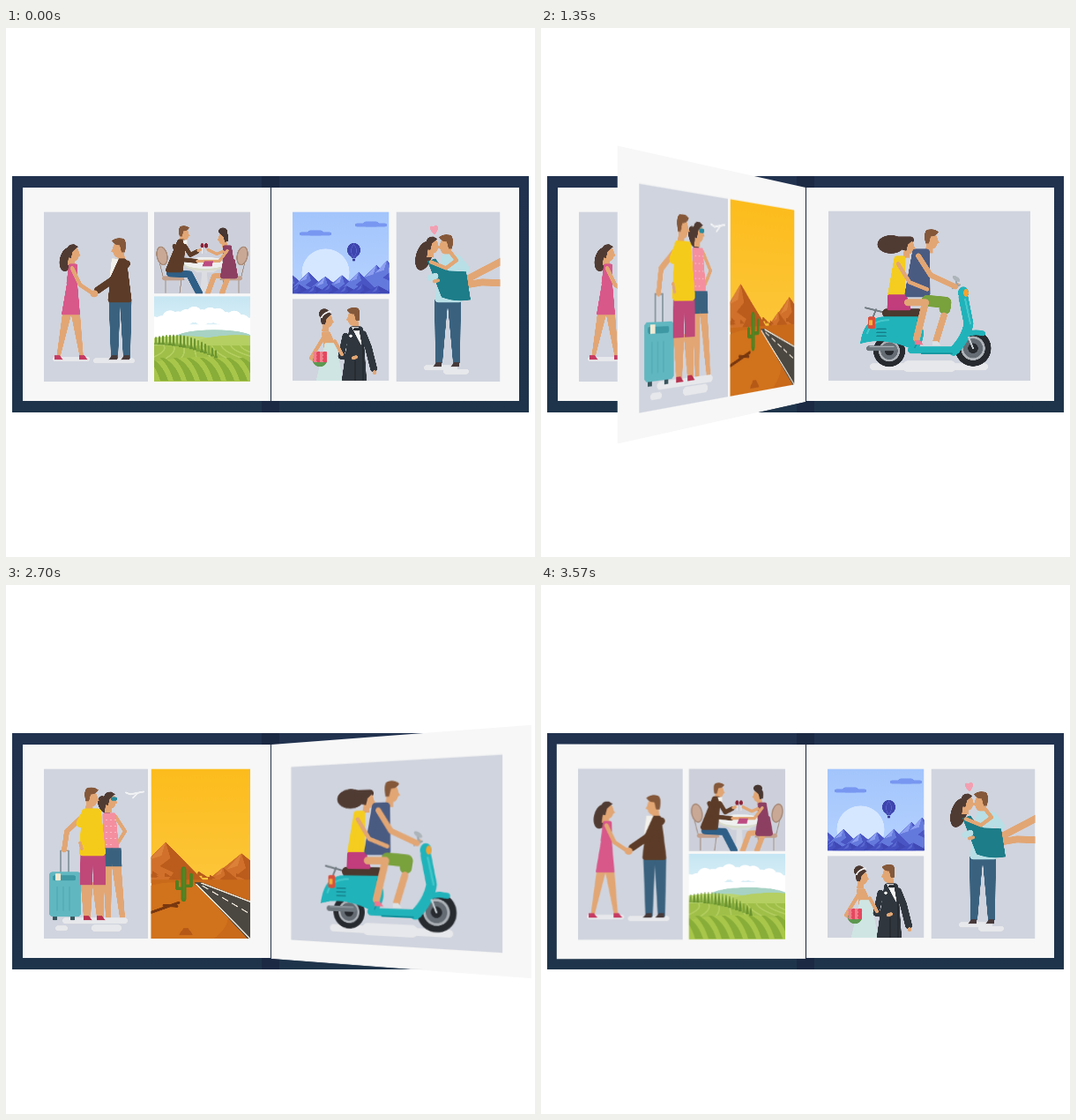
These frames come from a looping animation (600x600 px, 3.6 s). An HTML page with a canvas:

```html
<!DOCTYPE html>
<html lang="en">
<head>
<meta charset="utf-8">
<title>Photo album</title>
<style>
  html, body { margin: 0; width: 100%; height: 100%; overflow: hidden; background: #fff; }
  #stage { position: relative; width: 600px; height: 600px; overflow: hidden; perspective: 838px; perspective-origin: 300.5px 302px; }
  canvas { position: absolute; }
</style>
</head>
<body>
<div id="stage"></div>
<script>
const stage = document.getElementById('stage');
const SKIN = '#e2a674', BROWN = '#5c3c28', HAIR = '#85583a', DARK = '#503b33';
const DENIM = '#3a627f', WALL = '#d0d4de', SNOW = '#e7e8eb', PAPER = '#f7f7f7';
const PAGE = { top: 180.5, width: 281, height: 242.5 }, SPINE = 300.5;
let g;

function makeCanvas(x, y, w, h, draw) {
  const el = document.createElement('canvas'), k = 3;
  el.width = w * k;
  el.height = h * k;
  el.style.cssText = `left:${x}px;top:${y}px;width:${w}px;height:${h}px`;
  stage.append(el);
  g = el.getContext('2d');
  g.scale(k, k);
  g.translate(-x, -y);
  g.lineCap = g.lineJoin = 'round';
  draw();
  return el;
}

// Drawing helpers
function paint(color, d) {
  g.fillStyle = color;
  g.fill(new Path2D(d));
}
function limb(color, width, d) {
  g.strokeStyle = color;
  g.lineWidth = width;
  g.stroke(new Path2D(d));
}
function oval(color, x, y, rx, ry = rx, turn = 0) {
  g.fillStyle = color;
  g.beginPath();
  g.ellipse(x, y, rx, ry, turn, 0, Math.PI * 2);
  g.fill();
}
function box(color, x, y, w, h, r = 0) {
  g.fillStyle = color;
  g.beginPath();
  g.roundRect(x, y, w, h, r);
  g.fill();
}
const pill = (color, x, y, w, h) => box(color, x, y, w, h, h / 2);

// Upright shape between two centres, with a width at each end.
function taper(color, x0, y0, w0, x1, y1, w1, r = 0) {
  const a = Math.max(0, w0 / 2 - r), b = w1 / 2 - r;
  const d = `M${x0 - a} ${y0 + r}H${x0 + a}L${x1 + b} ${y1 - r}H${x1 - b}Z`;
  paint(color, d);
  if (r) limb(color, r * 2, d);
}
function legs(color, hip, top, width, feet, floor, ankle) {
  feet.forEach((foot, i) => {
    const side = (i ? 1 : -1) * width / 4;
    taper(color, hip + side, top, width / 2 + 1, foot, floor, ankle);
  });
}
function shoe(color, x, y, dir) {
  paint(color, `M${x - 3 * dir} ${y}v-5h${6 * dir}q${dir} 2 ${4 * dir} 5z`);
}
function head(x, y, dir, size, hair, long) {
  g.save();
  g.translate(x, y);
  g.scale(dir * size, size);
  taper(SKIN, -2, 2, 7, -3, 15, 9);
  oval(SKIN, 1, 1, 6, 9);
  paint(SKIN, 'M5-3L9 3 5 5Z');
  paint(hair, long ? 'M6-8Q2-5-1-2L-3 6-8 5Q-11-12 1-11Z' : 'M8-9Q5-4-1-4L-3 4-7 4Q-10-12-3-12Q4-13 8-9Z');
  g.restore();
}
function fade(y0, y1, from, to) {
  const f = g.createLinearGradient(0, y0, 0, y1);
  f.addColorStop(0, from);
  f.addColorStop(1, to);
  return f;
}
function photo(x, y, w, h, back, draw) {
  g.save();
  g.beginPath();
  g.rect(x, y, w, h);
  g.clip();
  box(back, x, y, w, h);
  draw();
  g.restore();
}
function repeat(n, draw) {
  for (let i = 0; i < n; i++) draw(i, i / (n - 1));
}
function seeded(seed) {
  return () => (seed = seed * 16807 % 2147483647) / 2147483647;
}

// Album pictures
function holdingHands() {
  pill(SNOW, 53, 372.5, 42, 5.5);
  pill(SNOW, 99, 374, 47, 6);
  legs(SKIN, 74, 323, 19, [59, 86], 375, 4);
  shoe('#c63a62', 58, 376, 1);
  shoe('#c63a62', 86, 376, 1);
  oval(DARK, 69, 262, 8, 14, .25);
  head(76.5, 255, 1, .92, DARK, true);
  taper('#d8588a', 76, 267, 10, 75, 291, 13, 2);
  taper('#d8588a', 75, 288, 12, 73.5, 325, 21, 1);
  limb(SKIN, 4.6, 'M75 272L84 291 99 301');
  legs(DENIM, 129.5, 308, 25, [123, 137], 375, 8);
  shoe('#47393a', 123, 376, -1);
  shoe('#47393a', 137, 376, -1);
  head(128, 250, -1, 1, HAIR);
  taper(BROWN, 129, 261, 16, 129, 311, 27, 3);
  taper('#f3f1ec', 124, 261, 8, 118, 282, 1);
  limb(BROWN, 8, 'M137 267L120 286 104 297');
  oval(SKIN, 100, 301, 4.5, 4);
}

function chair(x, dir) {
  const out = d => x + d * dir;
  limb('#a08c82', 1, `M${out(-4)} 261L${out(2)} 285H${out(25)}M${out(4)} 285V300M${out(22)} 285L${out(20)} 300`);
  oval('#a98b79', x, 258, 6.5, 11, -.2 * dir);
  oval('#c9a896', x, 258, 5, 9.5, -.2 * dir);
  pill('#c3a08c', Math.min(out(0), out(25)), 281, 25, 5);
}

function dinner() {
  chair(177, 1);
  chair(268, -1);
  taper('#dcdde2', 226, 268, 44, 226, 277, 18);
  taper('#dcdde2', 225, 270, 6, 225, 300, 8);
  oval('#d8dccb', 226, 268, 24, 7);
  oval('#eef0ef', 226, 266, 24, 6.5);
  limb('#2f5f86', 8, 'M186 278L208 279 219 300');
  head(202, 233, 1, .75, HAIR);
  taper(BROWN, 199, 239, 10, 191, 277, 20, 3);
  taper('#f3f1ec', 203, 240, 5, 205, 254, 1);
  limb(BROWN, 5, 'M203 247L209 257 217 253M191 247L197 262 216 264');
  limb(SKIN, 3.2, 'M218 252L221 251M217 264L222 264');
  limb(SKIN, 6, 'M251 280L236 281 229 300M252 282L245 300');
  oval('#473631', 246, 230, 5, 4);
  head(246, 238, -1, .72, '#473631', true);
  taper('#8d3f62', 251, 246, 10, 252, 266, 13, 2);
  taper('#8d3f62', 253, 261, 14, 253, 284, 20, 3);
  limb(SKIN, 3.4, 'M251 252L242 264 224 264M246 253L239 256 229 251');
  taper('#bd4b82', 230, 264, 10, 228, 270, 11);
  for (const x of [222.5, 227]) {
    oval('#8a2238', x, 246.5, 2, 2.8);
    limb('#f1f1f1', .8, `M${x} 249V255`);
  }
}

function fields() {
  repeat(13, (i, p) => oval('#fff', 168 + p * 109, 336 - 10 * Math.sin(p * Math.PI) + 2 * Math.sin(i * 2.3), 9, 9));
  box('#fff', 168, 336, 109, 18);
  oval('#a7d2c4', 236, 351, 44, 9);
  oval('#bad570', 200, 364, 60, 15);
  oval('#b5cf62', 262, 364, 56, 16);
  box('#9fbf49', 168, 360, 109, 40);
  repeat(9, i => limb('#b4cf60', 1.6, `M${178 + i * 11} 359Q${185 + i * 10} 366 ${165 + i * 17} 374`));
  oval('#a8c64a', 222, 402, 90, 29);
  repeat(9, i => {
    const x = 160 + i * 15;
    paint('#88ad38', `M${x} 374Q${x + 10} 383 ${x + 15} 400h9Q${x + 18} 381 ${x + 4} 374Z`);
  });
  repeat(18, (i, p) => {
    const foot = 359 + 15 * p * p;
    taper(i % 3 ? '#6b942f' : '#7ca539', 170 + i * 4, foot - 9 - 5 * Math.sin(p * Math.PI), 1, 170 + i * 4, foot, 3.6);
  });
}

function peak(x, y, width, base, [side, shade, glow]) {
  taper(side, x, y, 0, x, base, width);
  paint(glow, `M${x} ${y}l${-width * .2} ${width * .22}l${width * .15} ${-width * .05}Z`);
  paint(shade, `M${x} ${y}l${width * .06} ${width * .2}l${-width * .13} ${width * .1}l${width * .17} ${width * .08}L${x} ${base}H${x + width / 2}Z`);
}

function balloon() {
  oval('#d5e7ff', 362.5, 277, 27);
  for (const [x, y] of [[333, 231], [396, 221]]) {
    pill('#7897f1', x, y, 36, 4);
    pill('#7897f1', x + 9, y - 2, 18, 6);
  }
  const blues = ['#6479dc', '#4a55c4', '#8b9ef0'];
  peak(420, 268, 64, 301, blues);
  peak(432, 263, 66, 301, blues);
  repeat(5, i => peak(324 + i * 19, 279 - 3 * Math.sin(i * 2), 50, 301, blues));
  repeat(6, i => peak(332 + i * 18, 290 + i % 2 * 2, 34, 301, ['#4550c0', '#3f48b5', '#5a69d0']));
  oval('#3e45ae', 394.5, 251.5, 7.5, 8);
  taper('#3e45ae', 394.5, 256, 11, 394.5, 261, 3);
  box('#343a96', 393, 261.5, 3, 2.5, .6);
  for (const bend of [-3, 3]) limb('#5962cb', .7, `M394.5 245Q${394.5 + bend * 2} 252 394.5 260`);
}

function wedding() {
  oval('#4b3831', 361, 324, 6);
  head(364.5, 331, 1, .85, '#4b3831', true);
  taper(SKIN, 363, 344, 10, 368, 365, 15, 2);
  taper('#cfe5e3', 368, 357, 13, 367, 402, 31, 1);
  limb('#f0eeee', 1.8, 'M358 328Q360 323 368 321');
  limb(SKIN, 4.3, 'M360 351L346 374 355 381');
  oval('#5d9850', 356, 377, 8, 7);
  repeat(12, i => oval(i % 2 ? '#e4485f' : '#f07f8b', 351 + i % 4 * 3.6, 369 + Math.floor(i / 4) * 3.8, 2.6));
  head(394, 328, -1, .93, HAIR);
  taper('#30363d', 397, 338, 16, 395, 402, 28, 4);
  limb('#30363d', 8, 'M405 347L411 362 417 386');
  taper('#f4f4f4', 396, 339, 8, 403, 359, 1);
  pill('#20252a', 394, 340, 7, 3);
  limb('#171c21', .9, 'M405 359V400M396 377V400');
  limb('#30363d', 7, 'M385 349L380 372 393 374');
  limb(SKIN, 4, 'M373 355L381 370M394 374L397 373M418 390V391');
  oval('#fff', 391, 349, 1.7);
}

function carrying() {
  pill(SNOW, 474, 382, 38, 6);
  pill(SNOW, 496, 386.5, 29, 6);
  paint('#f39fb2', 'M486 234C478 227 481 222 485 225C488 220 494 226 486 234Z');
  legs(DENIM, 501, 308, 29, [491, 511], 380, 8);
  shoe('#47393a', 491, 384, -1);
  shoe('#47393a', 511, 384, -1);
  limb(SKIN, 8, 'M522 285L562 264M522 291L540 288 562 289');
  head(499, 246, -1, 1, HAIR);
  taper('#b8dfe6', 503, 256, 18, 502, 311, 31, 4);
  limb('#b8dfe6', 10, 'M512 262L521 273');
  oval(DARK, 474, 258, 9, 17, .3);
  head(484, 246, 1, .9, DARK, true);
  paint('#1d7d89', 'M478 264L487 261Q494 271 502 275L522 276 527 308Q510 311 494 305Z');
  limb(SKIN, 4.4, 'M482 265L499 272 511 263 504 254');
  limb('#b8dfe6', 7, 'M481 283L487 281');
  limb(SKIN, 4, 'M486 287L490 286M526 290L533 291');
}

function suitcase() {
  limb('#8e9ba4', 1.5, 'M62 325V301H71V325');
  for (const x of [53, 73]) box('#39555d', x, 373, 5, 7, 1);
  box('#61b7c0', 49, 325, 36, 51, 4);
  box('#3d98a4', 53, 329, 26, 6, 2);
  repeat(3, i => limb('#4da5af', 1, `M${58 + i * 7} 342V369`));
  box('#f2ead2', 56, 327, 6, 8, 1);
}

function travellers() {
  pill(SNOW, 64, 377, 74, 7);
  pill(SNOW, 97, 385, 34, 8);
  pill(SNOW, 56, 386, 14, 6);
  limb('#f0f2f4', 2, 'M136 235L141 237 156 234M149 236L144 241');
  suitcase();
  legs(SKIN, 120, 316, 20, [116, 132], 377, 6);
  oval(DARK, 112, 249, 7, 11, -.5);
  head(118.5, 244, 1, .9, DARK, true);
  box('#268a9b', 119, 240, 7, 4.2, 1.8);
  limb(SKIN, 4.2, 'M124 262L135 279 127 292');
  taper('#f48f9f', 117, 258, 15, 119, 299, 18, 2);
  repeat(14, i => oval('#fac1c9', 114 + i % 3 * 5, 266 + Math.floor(i / 3) * 7, .7));
  legs(DENIM, 120, 298, 20, [115, 126], 319, 11);
  legs(SKIN, 98, 337, 26, [92, 107], 377, 8);
  shoe('#b8314f', 91, 380, 1);
  shoe('#b8314f', 106, 380, 1);
  legs('#bf4879', 98.5, 304, 27, [91, 106], 340, 14);
  head(97, 241, 1, .98, HAIR);
  limb(SKIN, 6, 'M87 262L69 279 66 300');
  taper('#f5cb1b', 97, 253, 22, 98, 307, 30, 4);
  limb('#f5cb1b', 9, 'M90 259L84 270');
  limb(SKIN, 3.5, 'M84 292L86 299');
}

function desert() {
  const rust = ['#d0702a', '#bb5c1c', '#dc8138'];
  peak(181, 291, 92, 338, rust);
  peak(267, 304, 84, 338, rust);
  peak(246, 320, 44, 338, rust);
  const random = seeded(11);
  repeat(16, () => {
    const x = 165 + random() * 112, y = 322 + random() * 12;
    taper('#b85a1b', x, y, 1, x + 3, y + 4, 7);
  });
  box('#c9691a', 165, 334, 112, 67);
  oval('#d1721c', 190, 375, 62, 38);
  paint('#4b4741', 'M214 337H222L277 358V401H274Z');
  limb('#eee6d6', 1.4, 'M216 339L276 400M222 338L277 359');
  g.setLineDash([7, 6]);
  limb('#f2eadc', 1.2, 'M223 341L277 373');
  g.setLineDash([]);
  limb('#78370f', 3, 'M165 371L196 360M179 363L194 364');
  limb('#527f20', 6, 'M201.5 322V356');
  limb('#527f20', 3.5, 'M194 336V344H201M210 328V341H202');
  limb('#729a35', .8, 'M202 321V355');
  taper('#b55917', 204, 389, 6, 204, 397, 15, 1);
}

function wheel(x, y, r) {
  const rings = [['#272b30', 1], ['#adb2b8', .67], ['#656c73', .54], ['#272b30', .28]];
  for (const [color, size] of rings) oval(color, x, y, r * size);
}

function scooterBody() {
  const teal = '#21b3ba';
  limb('#747d84', 2, 'M368 317L388 322H426M380 319L376 329');
  pill('#4b382e', 387, 318, 46, 10);
  limb(teal, 8, 'M420 365H466');
  paint(teal, 'M362 358Q366 326 392 327H428Q441 350 425 366Q390 349 362 358Z');
  limb(teal, 11, 'M479 305L485 335Q482 352 468 366');
  limb('#45c8cb', 2, 'M370 346Q375 331 394 331M481 307L487 335');
  limb('#15959f', 1.6, 'M427 331Q433 347 424 362M432 369H466');
  repeat(3, i => limb('#147d88', 1.3, `M381 ${341 + i * 4}h10`));
  box('#d8503c', 371, 327, 8, 14, 2);
  box('#f4b33d', 372, 331, 4, 6, 1);
  limb('#6d767d', 6, 'M372 363H401');
  limb('#a9b1b6', 1.2, 'M373 361H400');
  limb('#c3cbd0', 2, 'M484 348L490 363');
  limb(teal, 6, 'M472 366Q476 341 501 346');
  oval(teal, 479, 300, 6, 7);
  oval('#f4a332', 482, 300, 2.8, 4.5);
}

function scooter() {
  pill(SNOW, 373, 380, 134, 8);
  pill(SNOW, 410, 377, 61, 13);
  wheel(395, 366, 18);
  wheel(490, 363, 20.5);
  limb(SKIN, 5, 'M470 293L472 291');
  limb('#9ca5ab', 2, 'M467 295L475 291M472 291L470 284');
  oval('#adb5ba', 471, 284, 5, 2.4, .6);
  scooterBody();
  oval(DARK, 397, 245, 15.5, 10.5);
  limb(DARK, 8, 'M405 240L419 240');
  head(417, 247, 1, .88, DARK, true);
  taper('#f4cd20', 407, 258, 13, 403, 306, 20, 3);
  taper('#c13d7c', 404, 302, 22, 406, 320, 27, 2);
  head(443, 240, 1, 1, HAIR);
  taper('#4a5b82', 431, 250, 20, 427, 305, 29, 4);
  limb(SKIN, 6, 'M428 258L442 280 470 293');
  limb(SKIN, 4.5, 'M405 267L418 288 438 296');
  limb('#79a13c', 13, 'M438 309L459 311 458 318');
  limb(SKIN, 7.5, 'M457 326L448 355');
  limb(SKIN, 8, 'M416 311L436 311 426 352');
  shoe('#f0758e', 427, 359, 1);
  shoe('#dce1e3', 447, 360, 1);
}

// Album and page turns
function page(x, draw) {
  const el = makeCanvas(x, PAGE.top, PAGE.width, PAGE.height, () => {
    box(PAPER, x, PAGE.top, PAGE.width, PAGE.height);
    draw();
  });
  el.style.transformOrigin = `${SPINE - x}px 50%`;
  return el;
}

makeCanvas(0, 0, 600, 600, () => {
  box(fade(168, 436, '#21324f', '#1e344a'), 7, 168, 586, 268);
  box('#1b2943', 290, 168, 20, 268);
  box('#16233a', 299.5, 181, 2, 242);
});

const spreads = [
  {
    left: page(19, () => {
      photo(43, 208, 118, 193, WALL, holdingHands);
      photo(168, 208, 109, 93, '#cdd0da', dinner);
      photo(168, 304, 109, 96.5, fade(304, 345, '#c6e6f3', '#def2f8'), fields);
    }),
    right: page(301, () => {
      photo(325, 208, 109.5, 93, fade(208, 301, '#a2c5fc', '#b6d2ff'), balloon);
      photo(325, 307, 109.5, 93, WALL, wedding);
      photo(442.5, 208, 118, 193, WALL, carrying);
    })
  },
  {
    left: page(19, () => {
      photo(43, 208, 118, 193, WALL, travellers);
      photo(164.5, 208, 112.5, 193, fade(208, 335, '#fcbc1c', '#fcc63a'), desert);
    }),
    right: page(301, () => photo(326, 207, 229, 193, WALL, scooter))
  }
];
const pages = spreads.flatMap(s => [s.left, s.right]);

function place(el, layer, degrees) {
  el.style.visibility = 'visible';
  el.style.zIndex = layer;
  el.style.transform = degrees ? `rotateY(${degrees}deg)` : 'none';
}

const HALF = 1800, TURN_START = 584, TURN_TIME = 1236, STEP = 30;
const start = performance.now();

function frame() {
  const now = Math.max(0, performance.now() - start) % (HALF * 2);
  const time = Math.floor(now / STEP) * STEP;
  const turn = time < TURN_START + TURN_TIME ? 0 : 1;
  const t = Math.min(1, Math.max(0, (time - turn * HALF - TURN_START) / TURN_TIME));
  const angle = 90 * (1 - Math.cos(Math.PI * t));
  const current = spreads[turn], next = spreads[1 - turn];
  for (const el of pages) el.style.visibility = 'hidden';
  place(current.left, 1, 0);
  place(next.right, 1, 0);
  if (angle < 90) place(current.right, 2, -angle);
  else place(next.left, 2, 180 - angle);
  requestAnimationFrame(frame);
}
frame();
</script>
</body>
</html>
```
